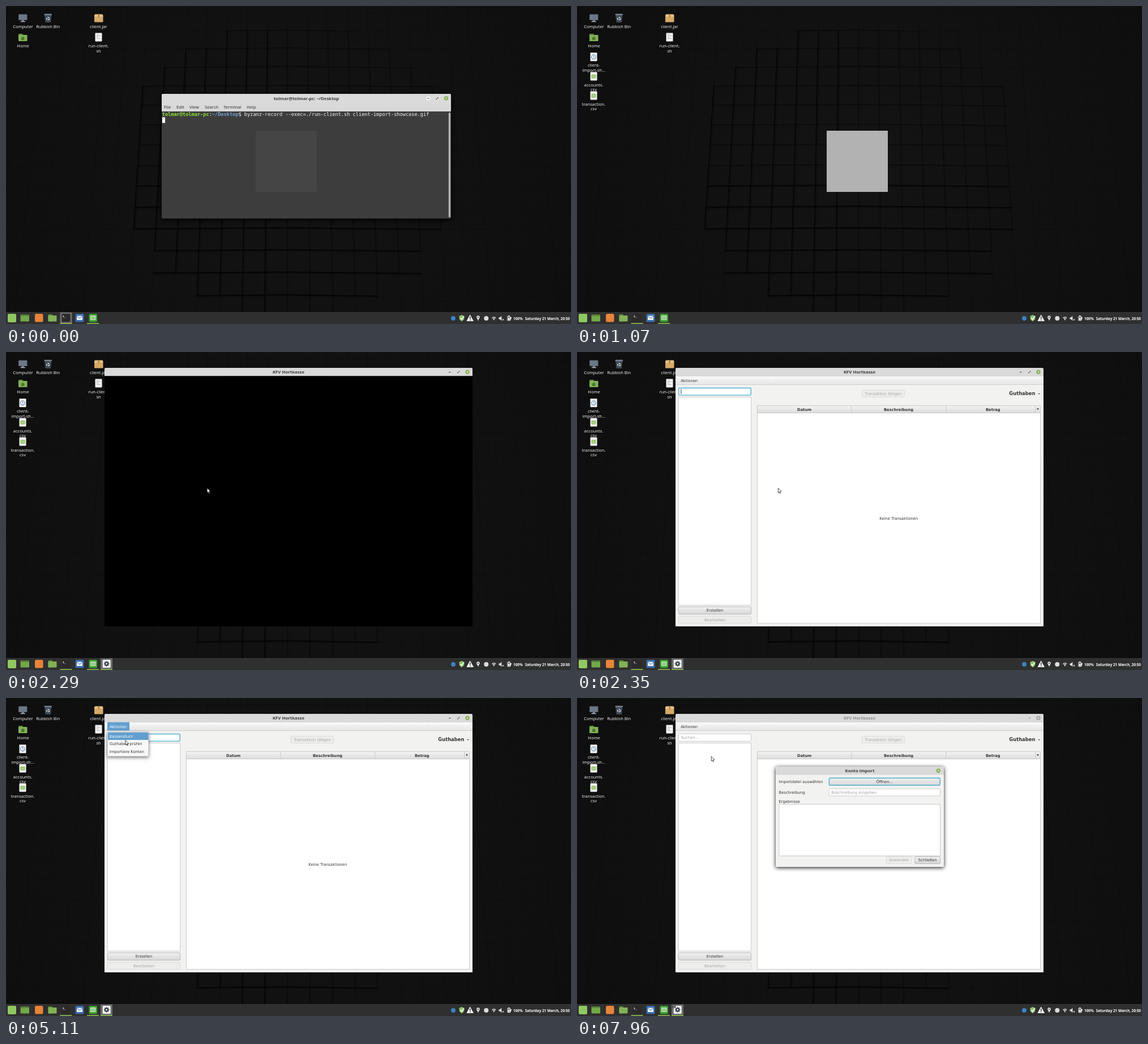
An HTML page with a canvas for the animation above (8000 ms loop, 998 by 561 pixels).

```html
<!DOCTYPE html>
<html lang="de">
<head>
<meta charset="utf-8">
<title>Desktop</title>
<style>
html, body { margin: 0; width: 100%; height: 100%; overflow: hidden; background: #101010; }
canvas { display: block; }
</style>
</head>
<body>
<canvas id="stage" width="998" height="561"></canvas>
<script>
const W = 998, H = 561, LOOP = 8000;
const stage = document.getElementById('stage');
let c = stage.getContext('2d');

const UI = '"Noto Sans", sans-serif';
const APP = '"DejaVu Sans", sans-serif';
const MONO = '"DejaVu Sans Mono", monospace';
const BLUE = '#629fcf', GREEN = '#8bb158', INK = '#333';
const APP_TITLE = 'KFV Hortkasse';

function box(x, y, w, h, fill, r = 0) {
  c.fillStyle = fill;
  c.beginPath();
  c.roundRect(x, y, w, h, r);
  c.fill();
}
function frame(x, y, w, h, color, r = 0, lw = 1) {
  c.strokeStyle = color;
  c.lineWidth = lw;
  c.beginPath();
  c.roundRect(x + lw / 2, y + lw / 2, w - lw, h - lw, r);
  c.stroke();
}
function disc(x, y, r, fill) {
  c.fillStyle = fill;
  c.beginPath();
  c.arc(x, y, r, 0, 7);
  c.fill();
}
function line(color, lw, ...p) {
  c.strokeStyle = color;
  c.lineWidth = lw;
  c.beginPath();
  for (let i = 0; i < p.length; i += 2) c.lineTo(p[i], p[i + 1]);
  c.stroke();
}
function poly(fill, ...p) {
  c.fillStyle = fill;
  c.beginPath();
  for (let i = 0; i < p.length; i += 2) c.lineTo(p[i], p[i + 1]);
  c.closePath();
  c.fill();
}
function text(s, x, y, font, color, align = 'left') {
  c.font = font;
  c.fillStyle = color;
  c.textAlign = align;
  c.fillText(s, x, y);
}
function shade(y, h, from, to) {
  const g = c.createLinearGradient(0, y, 0, y + h);
  g.addColorStop(0, from);
  g.addColorStop(1, to);
  return g;
}
function label(s, x, y, color = INK, align = 'left') {
  text(s, x, y + 2.4, '6.75px ' + APP, color, align);
}
function shadowed(color, blur, dy, draw) {
  c.save();
  c.shadowColor = color;
  c.shadowBlur = blur;
  c.shadowOffsetY = dy;
  draw();
  c.restore();
}

// Wallpaper: a grid of tiles in perspective, raised inside a rough disc
const gridX = (i, y) => 497 + i * (35.2 + 0.0092 * y);
const gridY = j => 43 + 31.5 * j + 0.345 * j * j;

function paintWallpaper() {
  const g = c.createRadialGradient(497, 270, 60, 497, 270, 600);
  g.addColorStop(0, '#131313');
  g.addColorStop(0.45, '#111111');
  g.addColorStop(1, '#0e0e0e');
  box(0, 0, W, H, g);

  for (let i = -14; i <= 14; i++) line('rgba(0,0,0,.22)', 1, gridX(i, 0), 0, gridX(i, H), H);
  for (let j = -1; j <= 14; j++) line('rgba(0,0,0,.2)', 1, 0, gridY(j) + 3, 497, gridY(j), W, gridY(j) + 3);

  const top = [0, 0, 0, 0, 1, 1, 2, 3];
  const bottom = [14, 14, 14, 13, 13, 12, 11, 10];
  for (let i = -7; i <= 7; i++) {
    const n = Math.abs(i), y0 = gridY(top[n]), y1 = gridY(bottom[n]);
    const a = i < 0 ? 0.65 : 0.22;
    line(`rgba(0,0,0,${a * 0.3})`, 5, gridX(i, y0) + 1, y0, gridX(i, y1) + 1, y1);
    line(`rgba(0,0,0,${a})`, 1.4, gridX(i, y0), y0, gridX(i, y1), y1);
    if (i < 0) line('rgba(255,255,255,.02)', 1, gridX(i, y0) - 1.6, y0, gridX(i, y1) - 1.6, y1);
  }
  const reach = [3, 5, 6, 7, 7, 7, 7, 7, 7, 7, 7, 6, 6, 4];
  reach.forEach((n, j) => {
    const y = gridY(j), a = j > 7 ? 0.8 : 0.3;
    const x0 = gridX(-n, y), x1 = gridX(n, y);
    line(`rgba(0,0,0,${a * 0.3})`, 5, x0, y + 1, 497, y - 1, x1, y + 2);
    line(`rgba(0,0,0,${a})`, 1.4, x0, y, 497, y - 1.5, x1, y + 1);
    line('rgba(255,255,255,.025)', 1, x0, y - 1.6, 497, y - 3, x1, y - 0.6);
  });
  box(441, 220, 108, 108, '#b2b2b2');
}

// Desktop icons
function iconLabel(x, y, ...rows) {
  rows.forEach((s, k) => {
    text(s, x + 0.5, y + 3.2 + k * 8.7, '7.5px ' + UI, '#000', 'center');
    text(s, x, y + 2.6 + k * 8.7, '7.5px ' + UI, '#f4f4f4', 'center');
  });
}
function folder(x, y, w, h) {
  box(x, y, w * 0.5, h, '#5c8a3c', 1);
  box(x, y + 2, w, h - 2, '#83b157', 1);
}
function sheet(x, y) {
  box(x - 6, y - 7.5, 12, 15, '#f5f5f5', 1);
}
function table(x, y, w, h, color) {
  frame(x, y, w, h, color, 0, 1);
  line(color, 1, x, y + h / 3, x + w, y + h / 3);
  line(color, 0.8, x, y + h * 0.66, x + w, y + h * 0.66);
  line(color, 0.8, x + w / 3, y, x + w / 3, y + h);
  line(color, 0.8, x + w * 0.66, y, x + w * 0.66, y + h);
}
function csvIcon(y, name) {
  sheet(29.5, y);
  table(25.5, y - 3, 8, 6.5, '#7fb84a');
  iconLabel(29.5, y + 15, name, 'csv');
}
function paintIcons(t) {
  box(22, 14.5, 15.5, 10.5, '#5c6673', 1);
  box(23, 15.5, 13.5, 8.5, '#6d7887');
  box(27.5, 25, 4.5, 2, '#78828e');
  box(25.5, 26.8, 8.5, 1.4, '#aab1b8');
  iconLabel(30, 36, 'Computer');

  poly('#3f4a55', 68, 15, 80.5, 15, 79, 29, 69.5, 29);
  box(67.5, 13.8, 13.5, 2.4, '#77838f', 1);
  c.setLineDash([3, 1.6]);
  c.strokeStyle = '#eee';
  c.lineWidth = 1.5;
  c.beginPath();
  c.arc(74.2, 22.3, 2.3, 0, 7);
  c.stroke();
  c.setLineDash([]);
  iconLabel(74.2, 36, 'Rubbish Bin');

  box(156, 15, 15.5, 13.5, '#d5aa68', 1);
  poly('#e4c084', 157.5, 14.5, 170, 14.5, 171.5, 19, 156, 19);
  box(162.5, 14.5, 2.5, 5.5, '#b58746');
  iconLabel(163.5, 36, 'client.jar');

  sheet(163.5, 55);
  [50, 52.5, 55, 57.5].forEach((y, k) => line('#a2a8ad', 0.8, 159.5, y, 164 + k % 2 * 3, y));
  iconLabel(163.5, 70.5, 'run-client.', 'sh');

  folder(22, 49, 15.5, 13);
  poly('#4b742f', 26, 57, 29.7, 53.5, 33.4, 57, 32.4, 57, 32.4, 60, 27, 60, 27, 57);
  iconLabel(30, 70.5, 'Home');

  if (t >= 140) {
    sheet(29.5, 89.8);
    c.strokeStyle = '#5d87b5';
    c.lineWidth = 1.1;
    c.beginPath();
    c.arc(29.5, 89.8, 3.8, 0, 7);
    c.stroke();
    line('#5d87b5', 0.9, 29.5, 87.3, 29.5, 90, 31.4, 90.6);
    iconLabel(29.7, 104.6, 'client-', 'import-sh…');
  }
  if (t >= 1070) {
    csvIcon(124, 'accounts.');
    csvIcon(158, 'transaction.');
  }
}

// Panel
function taskButton(x) {
  box(x - 10.5, 540.5, 21, 20.5, '#6c6c6c');
}
function underline(x) {
  box(x - 10.5, 559.2, 21, 1.8, '#84ad4c');
}
function gear(x, y) {
  box(x - 7, y - 7, 14, 14, '#f3f3f3', 1.5);
  for (let k = 0; k < 8; k++) {
    const a = k * Math.PI / 4, dx = Math.cos(a), dy = Math.sin(a);
    line('#35404b', 1.7, x + dx * 2.4, y + dy * 2.4, x + dx * 4.7, y + dy * 4.7);
  }
  disc(x, y, 3.5, '#35404b');
  disc(x, y, 1.4, '#f3f3f3');
}
function paintTray() {
  const white = '#ececec';
  disc(790, 551, 4, '#3b82c4');
  poly('#8fc16d', 800.3, 547, 805, 545, 809.8, 547, 809, 553, 805, 556.5, 801, 553);
  line('#fff', 1.5, 802.5, 550.5, 804.6, 553, 808.5, 547.8);
  poly('#fff', 819.7, 544.5, 826, 556, 813.4, 556);
  box(819, 548, 1.5, 4.2, '#222');
  box(819, 553.2, 1.5, 1.5, '#222');
  disc(834, 549, 2.7, white);
  disc(834, 549, 1.1, '#2f2f2f');
  poly(white, 832.3, 551, 835.7, 551, 834, 555.6);
  disc(848.3, 551, 4, '#dcdcdc');
  c.strokeStyle = white;
  c.lineWidth = 1.3;
  [2.3, 4.5].forEach(r => {
    c.beginPath();
    c.arc(861.8, 553.5, r, -2.4, -0.74);
    c.stroke();
  });
  disc(861.8, 553.3, 1, white);
  poly(white, 870.5, 549.5, 872.5, 549.5, 875.3, 546.8, 875.3, 555.2, 872.5, 552.5, 870.5, 552.5);
  line(white, 1, 876.7, 552, 879.3, 554.7);
  line(white, 1, 879.3, 552, 876.7, 554.7);
  frame(885.5, 547, 5.5, 8.3, white, 0.5, 1.1);
  box(887, 546, 2.5, 1.2, white);
  box(887, 549.5, 2.5, 4.5, white);
  poly(white, 891, 549, 893.2, 549, 891, 555);
  const font = 'bold 6.4px ' + UI;
  text('100%', 896, 553.6, font, '#fff');
  text('Saturday 21 March, 20:50', 996, 553.6, font, '#fff', 'right');
}
function paintPanel(t) {
  box(0, 540, W, 21, '#2f2f2f');
  box(0, 540, W, 0.8, '#383838');
  if (t < 340) taskButton(106);
  if (t >= 2050) taskButton(177.5);
  box(3, 543, 15, 15, '#8fc862', 2);
  box(25.5, 544.5, 15.5, 12, '#72a849', 1);
  box(25.5, 544.5, 15.5, 2.2, '#558038', 1);
  box(51, 543, 14.5, 14.5, '#e8833a', 2.5);
  folder(74.5, 544, 15, 12.5);
  box(98.5, 543, 15, 14.5, '#2a2a2a', 1.5);
  text('$_', 100, 548.6, 'bold 4.6px ' + MONO, '#eee');
  box(122.5, 543, 15, 14.5, '#376db0', 2);
  box(125, 546.5, 10, 7.5, '#f2f2f2', 0.5);
  line('#376db0', 1, 125, 547, 130, 551, 135, 547);
  box(146.5, 543, 14.5, 14.5, '#3ba02f', 2);
  table(149, 546, 9.5, 8, '#e9f5e6');
  underline(106);
  underline(153.5);
  if (t >= 1960) {
    gear(177.7, 550);
    if (t >= 2050) underline(177.5);
  }
  if (t >= 7150) {
    disc(171.3, 544.3, 3, '#3a3a3a');
    text('2', 171.3, 546, 'bold 4.6px ' + UI, '#fff', 'center');
  }
  paintTray();
}

// Window buttons
const minimise = (x, y, col) => box(x - 1.6, y - 0.5, 3.2, 1.1, col);
function maximise(x, y) {
  line('#444', 0.9, x + 0.3, y - 1.5, x + 1.6, y - 1.5, x + 1.6, y - 0.2);
  line('#444', 0.9, x - 1.6, y + 0.2, x - 1.6, y + 1.5, x - 0.3, y + 1.5);
  line('#444', 0.6, x - 1.2, y + 1.2, x + 1.2, y - 1.2);
}
function closer(x, y, fill) {
  disc(x, y, 3.7, fill);
  line('#f4f4f4', 1, x - 1.3, y - 1.3, x + 1.3, y + 1.3);
  line('#f4f4f4', 1, x - 1.3, y + 1.3, x + 1.3, y - 1.3);
}
function titleBar(x, y, w, h, title, color = '#3c3c3c') {
  box(x, y, w, h, '#dadada', [2, 2, 0, 0]);
  text(title, x + w / 2, y + h / 2 + 2.9, 'bold 7.8px ' + UI, color, 'center');
}

// Terminal
function drawTerminal(t) {
  shadowed('#000', 8, 2, () => box(275, 155, 511, 220, '#3d3d3d', 2));
  box(441, 220, 108, 108, '#454545');
  titleBar(275, 155, 511, 16, 'tolmar@tolmar-pc: ~/Desktop');
  if (t < 200) disc(746, 163, 3.8, '#f6f6f6');
  minimise(746, 163, '#444');
  maximise(761.5, 163);
  closer(777.5, 162.8, GREEN);
  box(275, 171, 511, 15, '#d9d9d9');
  const xs = [279, 301, 324, 351, 384, 425];
  ['File', 'Edit', 'View', 'Search', 'Terminal', 'Help'].forEach((s, k) =>
    text(s, xs[k], 180.8, '7.7px ' + UI, INK));
  const parts = [['tolmar@tolmar-pc', '#8ae234', 'bold '], [':', '#fff', ''], ['~/Desktop', '#729fcf', 'bold '],
    ['$ byzanz-record --exec=./run-client.sh client-import-showcase.gif', '#f2f2f2', '']];
  let x = 275.7;
  for (const [s, color, weight] of parts) {
    text(s, x, 194.2, weight + '8.62px ' + MONO, color);
    x += c.measureText(s).width;
  }
  box(276, 196.3, 5, 10, '#fff');
  box(781.8, 188, 3.4, 185, '#b4b4b4', 1.7);
}
function paintTerminal(t) {
  if (t >= 460) return;
  if (t < 340) return drawTerminal(t);
  const k = t < 400 ? 0.25 : 0.65;
  c.save();
  c.globalAlpha = 1 - k * 0.8;
  c.translate(106 * k, 550 * k);
  c.scale(1 - k, 1 - k);
  drawTerminal(t);
  c.restore();
}

// Application
function button(x, y, w, h, s, state) {
  const off = state === 'off';
  box(x, y, w, h, off ? '#ededec' : shade(y, h, '#f2f2f2', '#d6d6d6'), 1.5);
  frame(x, y, w, h, off ? '#dadada' : state === 'focus' ? '#4fb0d2' : '#b4b4b4', 1.5, state === 'focus' ? 1.4 : 0.9);
  label(s, x + w / 2, y + h / 2, off ? '#a5a5a5' : INK, 'center');
}
function field(x, y, w, h, focus) {
  box(x, y, w, h, '#fff', 1.5);
  frame(x, y, w, h, focus ? '#4fb0d2' : '#c4c4c4', 1.5, focus ? 1.4 : 0.9);
}
function caretOn(t) {
  if (t < 2500) return true;
  if (t < 4820) return Math.floor((t - 2490) / 500) % 2 === 1;
  return t >= 6980;
}
function paintMenu(t) {
  shadowed('rgba(0,0,0,.55)', 6, 2, () => box(179, 60, 73, 43, '#f8f8f8'));
  frame(179, 60, 73, 43, '#c0c0c0', 0, 0.7);
  const active = t < 5060 ? -1 : t < 5160 ? 0 : t < 5210 ? 1 : 2;
  ['Kassensturz', 'Guthaben prüfen', 'Importiere Konten'].forEach((s, k) => {
    const y = 67.3 + k * 13.5;
    if (k === active) box(180, y - 6.6, 71.5, 13.2, BLUE);
    label(s, 183, y, k === active ? '#fff' : INK);
  });
}
function drawApp(t) {
  const modal = t >= 7080;
  titleBar(174, 28, 650, 14.5, APP_TITLE, modal ? '#8e8e8e' : undefined);
  if (modal) {
    minimise(799.3, 35.5, '#999');
    closer(815, 35.3, '#a8a8a8');
  } else {
    minimise(783.8, 35.5, '#444');
    maximise(799.3, 35.5);
    closer(815, 35.3, GREEN);
  }
  if (t < 2350) return box(174, 42.5, 650, 441.5, '#000');

  box(174, 42.5, 650, 441.5, '#f2f2f1');
  box(174, 42.5, 650, 15, shade(42.5, 15, '#fafafa', '#e5e5e5'));
  box(174, 57, 650, 0.8, '#c6c6c6');
  const hot = t >= 4500 && !modal;
  if (hot) box(179, 42.8, 39, 14.4, BLUE);
  label('Aktionen', 183.2, 50.4, hot ? '#fff' : INK);

  field(179, 62.8, 129, 14, !modal);
  if (modal) label('Suchen...', 183.5, 69.8, '#a0a0a0');
  else if (caretOn(t)) box(183.5, 65.3, 0.9, 8.7, '#222');
  box(179, 79, 129, 368, '#fff');
  frame(179, 79, 129, 368, '#c8c8c8', 0, 0.9);
  button(179, 449, 129, 14, 'Erstellen');
  button(179, 465.5, 129, 13.5, 'Bearbeiten', 'off');
  button(503, 66.8, 76, 13, 'Transaktion tätigen', 'off');
  const bold = 'bold 8.4px ' + APP;
  text('Guthaben', 763.3, 76.4, bold, INK);
  text('-', 814.6, 76.4, bold, INK);

  box(318, 94, 501, 385, '#fff');
  box(318, 94, 501, 13.5, shade(94, 13.5, '#f4f4f4', '#dcdcdc'));
  box(318, 107, 501, 0.8, '#bdbdbd');
  [484.5, 651.5, 809.5].forEach(x => box(x, 94, 0.8, 13.5, '#c2c2c2'));
  frame(318, 94, 501, 385, '#c8c8c8', 0, 0.9);
  [['Datum', 401.7], ['Beschreibung', 568], ['Betrag', 734.8]].forEach(([s, x]) =>
    text(s, x, 103.8, 'bold 6.75px ' + APP, INK, 'center'));
  line(INK, 1.1, 812.4, 100.3, 815.6, 100.3);
  line(INK, 1.1, 814, 98.7, 814, 101.9);
  label('Keine Transaktionen', 568.3, 293.7, INK, 'center');
  if (t >= 4820 && t < 6980) paintMenu(t);
}
function opening(alpha, scale, cx, cy, draw) {
  c.save();
  c.globalAlpha = alpha;
  c.translate(cx, cy);
  c.scale(scale, scale);
  c.translate(-cx, -cy);
  draw();
  c.restore();
}
function drawDialog(t) {
  shadowed('rgba(0,0,0,.9)', 7, 1.5, () => box(351, 121, 297, 177, '#f2f2f1', 2));
  titleBar(351, 121, 297, 14.5, 'Konto import');
  closer(638.3, 128.3, GREEN);
  if (t < 7220) return box(351, 135.5, 297, 162.5, '#000');
  label('Importdatei auswählen', 356.6, 147.7);
  label('Beschreibung', 356.6, 166.4);
  label('Ergebnisse', 356.6, 182.5);
  button(444.7, 140.5, 197.3, 14, 'Öffnen...', 'focus');
  field(444.7, 159.8, 197.3, 13.4);
  label('Beschreibung eingeben', 449.3, 166.4, '#a0a0a0');
  box(356.5, 187, 285.5, 92, '#fff');
  frame(356.5, 187, 285.5, 92, '#c4c4c4', 0, 0.9);
  button(546, 279.5, 45.5, 13, 'Anwenden', 'off');
  button(596.5, 279.3, 45.5, 13.3, 'Schließen');
}
function paintApp(t) {
  if (t < 2190) return;
  if (t < 2290) opening(0.6, 0.92, 499, 256, () => drawApp(t));
  else drawApp(t);
  if (t < 7080) return;
  if (t < 7150) opening(0.6, 0.92, 499.5, 209, () => drawDialog(t));
  else drawDialog(t);
}

// Pointer: time, x, y of the tip
const path = [[0, 355.3, 240], [3990, 355.3, 240], [4540, 204, 48.5], [5010, 204, 48.5], [5110, 211, 74.5],
  [5260, 224.6, 96.8], [5430, 224.6, 96.8], [5590, 226, 97], [7880, 226, 97], [7960, 237.3, 103], [8000, 237.3, 103]];
function pointerAt(t) {
  const k = path.findIndex(p => p[0] > t);
  const [t0, x0, y0] = path[k - 1], [t1, x1, y1] = path[k];
  let u = (t - t0) / (t1 - t0);
  if (t0 === 3990) u = u * u * (3 - 2 * u);
  return [x0 + (x1 - x0) * u, y0 + (y1 - y0) * u];
}
function paintPointer(t) {
  if (t < 2190) return;
  // Motion is seen in ticks of 40 ms, landing on whole poses
  const tick = t >= 7960 || t < 4000 ? t : t >= 5010 && t < 5260 ? 5010 + Math.floor((t - 5010) / 50) * 50 : Math.floor(t / 40) * 40;
  const [x, y] = pointerAt(tick);
  c.beginPath();
  [[0, 0], [0, 8.2], [1.8, 6.6], [3.1, 9.5], [4.4, 8.9], [3.2, 6.1], [5.7, 5.9]].forEach(([dx, dy]) => c.lineTo(x + dx, y + dy));
  c.closePath();
  c.fillStyle = '#fff';
  c.fill();
  c.strokeStyle = '#222';
  c.lineWidth = 0.8;
  c.stroke();
}

const screen = c;
const wallpaper = document.createElement('canvas');
wallpaper.width = W;
wallpaper.height = H;
c = wallpaper.getContext('2d');
paintWallpaper();
c = screen;

function paint(t) {
  c.drawImage(wallpaper, 0, 0);
  paintIcons(t);
  paintPanel(t);
  paintTerminal(t);
  paintApp(t);
  paintPointer(t);
}
const start = performance.now();
function loop() {
  paint((performance.now() - start) % LOOP);
  requestAnimationFrame(loop);
}
loop();
</script>
</body>
</html>
```
